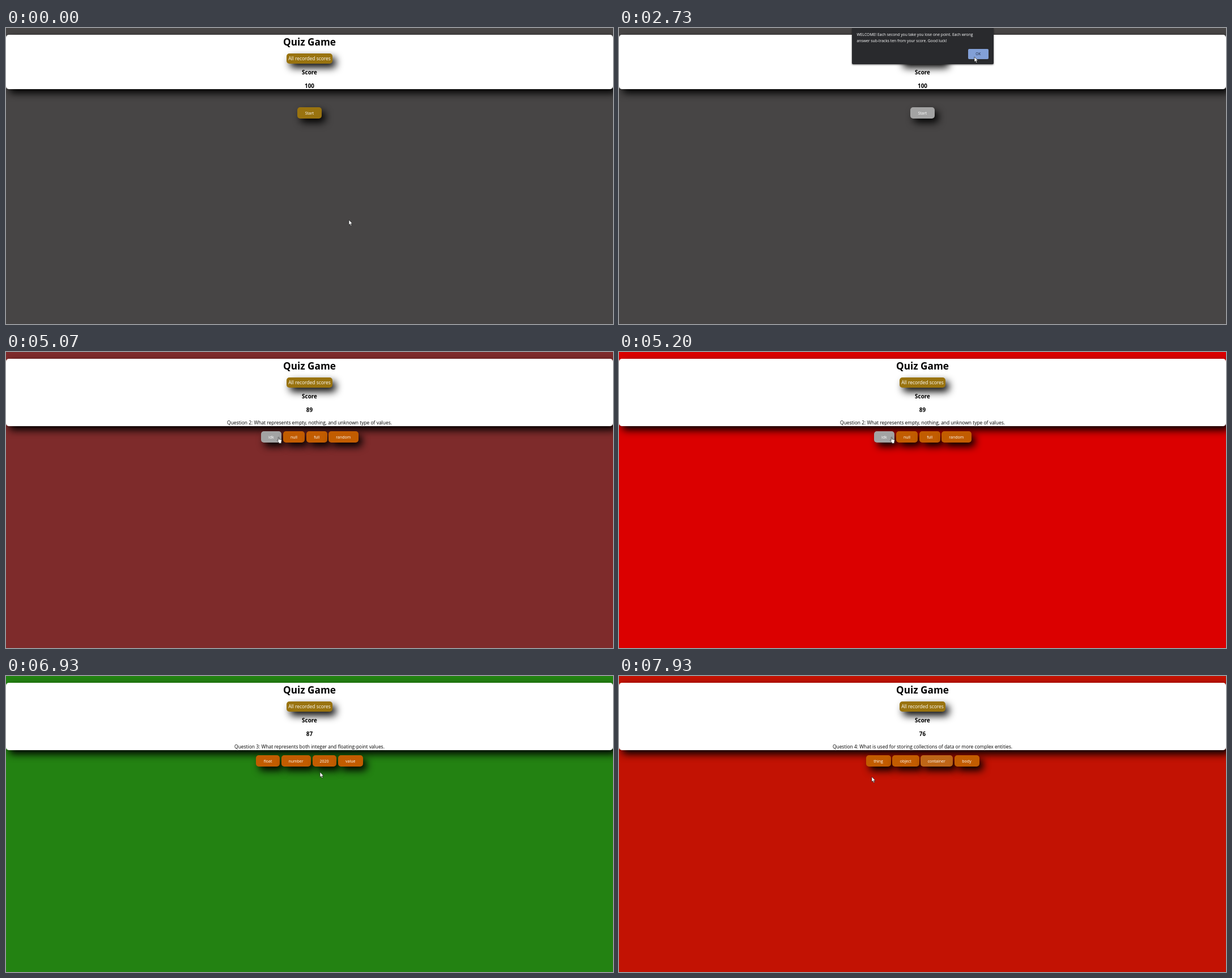
An HTML page that plays this animation: 1071 by 523 pixels, repeating every 8 s.

```html
<!DOCTYPE html>
<html lang="en">
<head>
<meta charset="utf-8">
<title>Quiz Game</title>
<style>
html, body { margin: 0; width: 100%; height: 100%; overflow: hidden; }
body { position: relative; font: 8.45px "Open Sans", "Noto Sans", sans-serif; color: #000; }
div, svg { position: absolute; box-sizing: border-box; white-space: nowrap; }
.line { left: 0; width: 1071px; height: 20px; line-height: 20px; text-align: center; }
.box { border-radius: 5px; box-shadow: 6px 7px 14px #000; }
.button { color: #fff; text-align: center; }
.answer { top: 139.5px; height: 20.5px; line-height: 21px; font-size: 7px; }
#head { left: 0; top: 12px; width: 1071px; background: #fff; }
#scores { left: 495px; top: 45px; width: 81px; height: 17.5px; line-height: 18px; background: #99730f; }
#title { top: 15px; font-size: 17.2px; font-weight: 700; }
.bold { font-size: 9.9px; font-weight: 700; }
#dialog { left: 410.5px; top: 0; width: 250px; height: 63.5px; padding: 6px 9px; border-radius: 0 0 2px 2px;
  background: #292a2d; color: #fff; font-size: 6.8px; line-height: 11.1px; box-shadow: 0 1px 3px #0008; }
#ok { left: 205px; top: 37px; width: 36.5px; height: 18px; line-height: 18px; border-radius: 2px;
  background: #82a0d7; color: #202a40; text-align: center; font-size: 6.5px; }
</style>
</head>
<body>
<div id="head" class="box"></div>
<div id="title" class="line">Quiz Game</div>
<div id="scores" class="box button">All recorded scores</div>
<div class="line bold" style="top:67.5px">Score</div>
<div id="score" class="line bold" style="top:91.5px"></div>
<div id="question" class="line" style="top:115px"></div>
<div id="answers"></div>
<div id="dialog">WELCOME! Each second you take you lose one point. Each wrong<br>answer sub-tracks ten from your score. Good luck!<div id="ok">OK</div></div>
<svg id="cursor" width="14" height="16" style="overflow:visible" fill="#fff" stroke="#111" stroke-width=".6">
  <path id="arrow" d="M0 0V9L2 7.2L3.4 10.6L4.9 10L3.5 6.7H6.3Z"/>
  <path id="hand" d="M1.2 .8Q2 -.4 2.7 .8V4L6.5 4.8Q7.5 5 7.4 6.2L6.8 9V11.2H2.2V9.6L-.5 6.6Q-.6 5.5 .3 5.7L1.2 6.6Z"/>
</svg>
<script>
const $ = id => document.getElementById(id);
const GREY = [71, 69, 69], RED = [220, 0, 0], GREEN = [35, 130, 18];
const GOLD = [153, 115, 15], ORANGE = [194, 92, 0], HOVER = [163, 163, 163];

// Each stage: start time, question, answers as [label, left, right]
const stages = [
  [0, "", [["Start", 514.3, 556.7]]],
  [3530, "Question 1: What represents true and false values.",
    [["child", 439.5, 482], ["boolean", 485, 538], ["balloon", 540.5, 592], ["var", 594.5, 631.5]]],
  [5000, "Question 2: What represents empty, nothing, and unknown type of values.",
    [["idk", 449.5, 486], ["null", 489, 527], ["full", 530, 566.5], ["random", 569, 621.5]]],
  [6260, "Question 3: What represents both integer and floating-point values.",
    [["float", 441, 483], ["number", 485.5, 537.5], ["2020", 540.5, 582.5], ["value", 585.5, 630]]],
  [7795, "Question 4: What is used for storing collections of data or more complex entities.",
    [["thing", 435.5, 479.5], ["object", 482, 529.5], ["container", 531.5, 589], ["body", 591.5, 635.5]]]
];
const scores = [[0, 100], [4590, 99], [5000, 89], [5590, 88], [6590, 87], [7590, 86], [7795, 76]];
const flashes = [[5020, RED], [6290, GREEN], [7820, RED]];
// Button index, pointer in, pointer out
const hovers = [[0, 960, 3530], [0, 4360, 5330], [1, 5820, 6450], [2, 7080, 7820]];
const path = [
  [0, 605, 339], [270, 530, 255], [500, 431, 150], [670, 470, 95], [870, 532, 101], [1000, 536, 140],
  [1330, 540, 148], [1870, 540, 148], [2200, 595, 92], [2470, 646, 41], [2730, 627, 51], [3470, 627, 51],
  [3800, 610, 150], [4200, 575, 198], [4330, 520, 164], [4600, 479, 150], [5250, 479, 150],
  [5470, 480, 171], [5800, 492, 163], [6000, 511, 157], [6330, 511, 157], [6600, 530, 176],
  [6930, 554, 170], [7070, 556, 160], [7270, 560, 158], [7780, 560, 158], [7930, 446, 178]
];

const clamp = v => Math.max(0, Math.min(1, v));
const mix = (a, b, k) => a.map((v, i) => v + (b[i] - v) * k);
const rgb = c => `rgb(${c.map(Math.round)})`;
const latest = (list, t) => list.filter(e => e[0] <= t).pop();

// CSS "ease" over 200 ms
function ease(ms) {
  const x = clamp(ms / 200);
  let lo = 0, hi = 1;
  for (let i = 0; i < 16; i++) {
    const s = (lo + hi) / 2;
    if (.75 * s * (1 - s) + s ** 3 < x) lo = s; else hi = s;
  }
  return x === 1 ? 1 : .3 * lo * (1 - lo) ** 2 + 3 * lo * lo * (1 - lo) + lo ** 3;
}

function pointer(t) {
  const i = path.findIndex(p => p[0] > t);
  if (i < 0) return path[path.length - 1];
  const a = path[i - 1], b = path[i];
  return mix(a, b, (t - a[0]) / (b[0] - a[0]));
}

let shown;
function showStage(stage) {
  if (stage === shown) return;
  shown = stage;
  $("question").textContent = stage[1];
  $("head").style.height = stage[1] ? "118.5px" : "96px";
  $("answers").innerHTML = stage[2].map(([label, l, r]) =>
    `<div class="box button answer" style="left:${l}px;width:${r - l}px">${label}</div>`).join("");
}

function draw(t) {
  const stage = latest(stages, t);
  showStage(stage);
  $("score").textContent = latest(scores, t)[1];
  document.body.style.background = rgb(flashes.reduce((c, [at, to]) => mix(c, to, ease(t - at)), GREY));

  [...$("answers").children].forEach((button, i) => {
    const level = hovers.reduce((sum, [n, on, off]) =>
      n === i ? sum + ease(t - on) - ease(t - off) : sum, 0);
    button.style.background = rgb(mix(stage[1] ? ORANGE : GOLD, HOVER, stage[1] || t < 3530 ? level : 0));
  });

  $("dialog").style.opacity = t < 3530 ? clamp((t - 1400) / 267) : 0;

  const [, x, y] = pointer(t);
  const modal = t > 1460 && t < 3530;
  const hand = !modal && hovers.some(([, on, off]) => t >= on && t < off);
  $("cursor").style.transform = `translate(${x}px,${y}px)`;
  $("arrow").style.display = hand ? "none" : "";
  $("hand").style.display = hand ? "" : "none";
}

// The screen refreshes 15 times a second
const STEP = 1000 / 15;
const start = performance.now();
function tick() {
  const t = (performance.now() - start) % 8000;
  draw(Math.floor((t + 5) / STEP) * STEP);
  requestAnimationFrame(tick);
}
tick();
</script>
</body>
</html>
```
